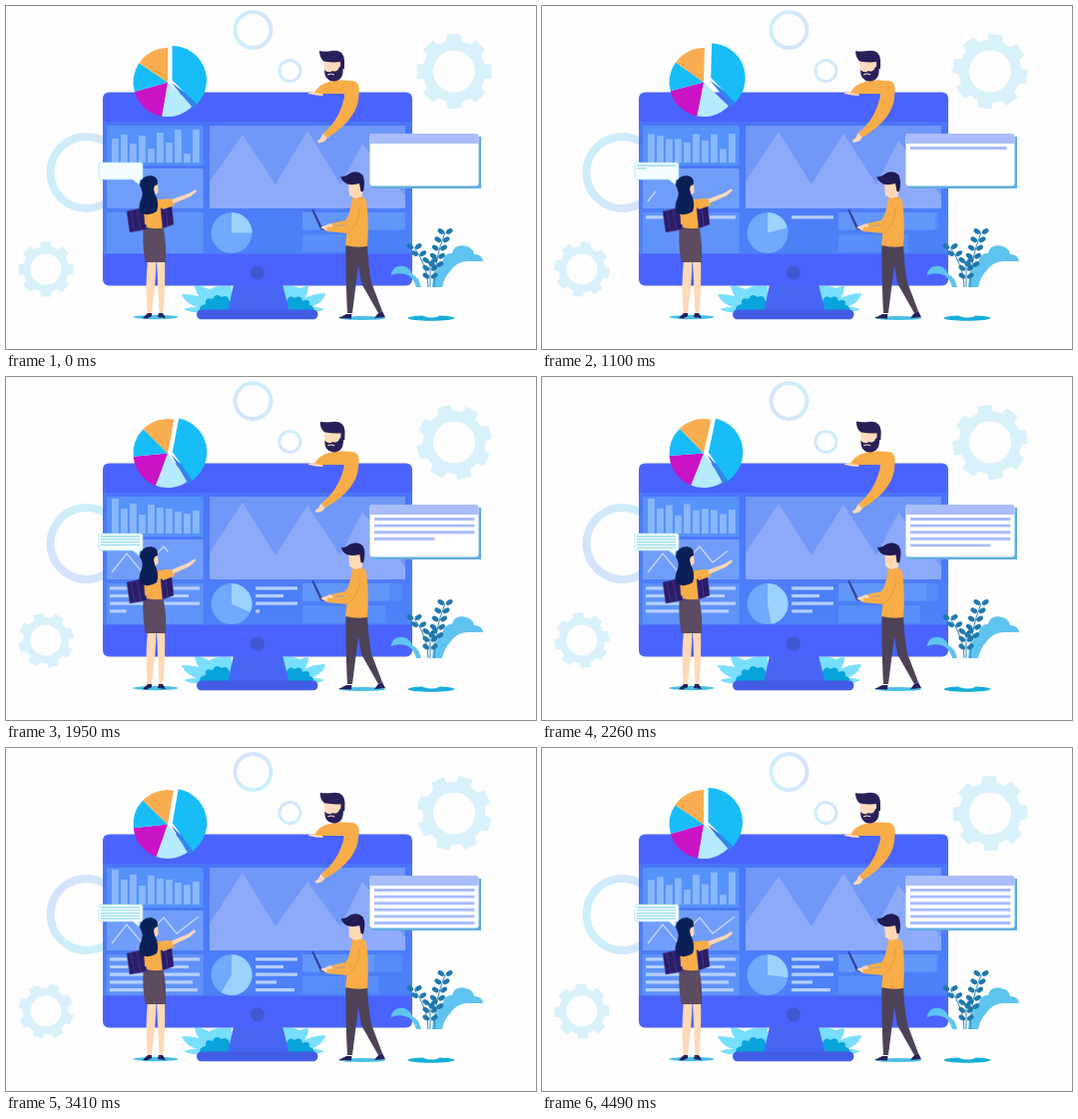
An HTML page that plays this animation: 531x344 px, repeating every 4.56 s.

```html
<!DOCTYPE html>
<html lang="en">
<head>
<meta charset="utf-8">
<title>Dashboard team</title>
<style>
  html, body { margin: 0; width: 100%; height: 100%; overflow: hidden; background: #fefefe; }
  svg { display: block; width: 531px; height: 344px; }
</style>
</head>
<body>
<svg viewBox="0 0 531 344" xmlns="http://www.w3.org/2000/svg">
  <defs>
    <linearGradient id="ringTint" x1="0" y1="0" x2="1" y2="0">
      <stop offset="0" stop-color="#cdeffa"/><stop offset="1" stop-color="#d5e3fc"/>
    </linearGradient>
    <linearGradient id="screenTint" x1="0" y1="0" x2="0" y2="1">
      <stop offset="0" stop-color="#4a74fa"/><stop offset="1" stop-color="#4c82f8"/>
    </linearGradient>
  </defs>

  <g fill="none" stroke="url(#ringTint)">
    <circle class="ring" cx="247.5" cy="24" r="18" stroke-width="4"/>
    <circle class="ring" cx="284.5" cy="65" r="10.5" stroke-width="3"/>
    <circle class="ring" cx="80.5" cy="167" r="36" stroke-width="8"/>
  </g>
  <g fill="#d9f1fa" fill-rule="evenodd">
    <path id="bigGear"/><path id="smallGear"/>
  </g>

  <!-- foliage around the stand -->
  <g fill="#79dfff">
    <path d="M214 307Q205 289 176 289Q180 303 214 307ZM216 304Q210 281 189 280Q191 298 216 304ZM226 304V281Q212 279 204 284Q208 299 226 304ZM209 307Q192 299 178 304Q186 309 209 307Z"/>
    <path d="M286 307Q294 289 320 288Q318 302 286 307ZM282 304Q286 282 303 281Q303 297 282 304ZM276 304V281Q288 279 296 284Q292 299 276 304ZM291 307Q306 299 319 304Q311 309 291 307Z"/>
  </g>
  <g fill="#08a4db">
    <path d="M195 307Q192 300 200 299Q199 291 207 294Q210 287 216 292Q222 289 224 296V307Z"/>
    <path d="M281 307V296Q284 289 289 293Q296 289 297 296Q305 293 304 300Q310 301 308 307Z"/>
  </g>

  <!-- monitor -->
  <path d="M228 279H277L284 307H222Z" fill="#4866f4"/>
  <rect x="191" y="304.500" width="121.500" height="9.800" rx="4.700" fill="#425ce6"/>
  <rect x="97" y="86.500" width="310" height="194" rx="6" fill="#4a63fc"/>
  <rect x="97" y="116" width="310" height="132.500" fill="url(#screenTint)"/>
  <circle cx="252" cy="267.500" r="7" fill="#3f58cf"/>

  <!-- screen panels -->
  <rect x="101" y="120" width="96.500" height="40" fill="#5592fa"/>
  <rect x="101" y="163" width="96.500" height="40" fill="#719dfa"/>
  <rect x="101" y="207" width="96.500" height="41" fill="#6093f9"/>
  <rect x="204" y="120" width="196" height="83" fill="#6f98f8"/>
  <path id="mountains" fill="#8daafa"/>
  <g id="bars" fill="#88b7fc"></g>
  <path id="trend" d="M106 196L121 177L135 194L158 170L171 186L193 169" pathLength="1" stroke-dasharray="1 2" fill="none" stroke="#c5d8ff" stroke-width="1.300"/>
  <g id="notes" stroke="#b5d0fd" stroke-width="3.200"></g>
  <g id="legend" stroke="#b5d0fd" stroke-width="3.200"></g>
  <circle cx="226" cy="227.500" r="20.500" fill="#70aafc"/>
  <path id="share" fill="#9bd2fe"/>
  <g fill="#669bfb">
    <rect x="297" y="207" width="100" height="17.500" opacity=".4"/>
    <rect id="meterA" x="297" y="207" height="17.500" opacity=".8"/>
    <rect id="meterB" x="297" y="229" height="17.500" opacity=".45"/>
  </g>

  <g id="pie"></g>

  <!-- man leaning over the top -->
  <path d="M303 87Q309 85 316 86L318 90Q311 90 303 88Z" fill="#ffd8b5"/>
  <path d="M309 87Q314 78 324 76Q340 72 350 77L344 88H317Z" fill="#f8ad49"/>
  <g id="pointer">
    <path d="M338 76Q356 71 353.500 88Q354 112 322.500 132L317.500 128Q334 115 339 91Z" fill="#f8ad49"/>
    <path d="M317.500 128L322 132L319 136L313 137.500L312 135.500L315 133Z" fill="#ffd8b5"/>
  </g>
  <g id="leanHead">
    <path d="M318.500 54H337V68H319Z" fill="#ffdcbd"/>
    <path d="M319 64Q323 68 327 65Q332 67 334 61H337.500Q339 75 328 75.500Q319 75 319 64Z" fill="#2a2059"/>
    <path d="M314 45Q320 46 326 45Q338 43 339 54V63H335V56Q328 57 318.500 55.500Q314 52 314 45Z" fill="#2a2059"/>
    <path d="M322 69Q326 67 329 69" stroke="#ffdcbd" fill="none"/>
  </g>

  <!-- text card -->
  <rect x="367" y="131" width="109" height="52" fill="#60addf"/>
  <rect x="364.500" y="128" width="109" height="52.500" rx="3" fill="#fff"/>
  <path d="M364.500 138V131Q364.500 128 367.500 128H470.500Q473.500 128 473.500 131V138Z" fill="#a9bdfc"/>
  <g id="card" stroke="#a9bcfb" stroke-width="2.900"></g>

  <!-- plant -->
  <ellipse cx="426" cy="313" rx="23.500" ry="2.800" fill="#16add9"/>
  <path d="M411 282H440L434 311Q427 314 418 311Z" fill="#fefefe"/>
  <g fill="#5fc3ef">
    <path d="M386 268Q389 259 399 261Q405 263 407 269Q414 272 416 282H411Q408 271 400 269Q392 267 386 270Z"/>
    <path d="M427 282Q427 267 437 258Q439 247 447 248Q449 239 459 240.500Q468 242 469 249Q477 249 478 256H462Q452 256 445 266Q439 272 437 282Z"/>
  </g>
  <g id="stems" fill="#1f78ad" stroke="#1f78ad"></g>

  <!-- woman -->
  <ellipse cx="150" cy="312" rx="22.500" ry="2.200" fill="#48bfe5"/>
  <path d="M142 254H150.500Q150 282 145.500 309H142Q139 283 142 254ZM151 254H159Q160 283 157 309H153.500Z" fill="#ffd8b5"/>
  <path d="M137 313L142 308H146V311L141 313.500ZM152 312L153 308H157L160 313Z" fill="#25205c"/>
  <path d="M138 219H157Q161 237 160 257H139.500Q136 238 138 219Z" fill="#5c4b61"/>
  <path d="M137 196Q147 191 157 195L160 222Q149 225 138 221Z" fill="#f8ad49"/>
  <g fill="#2a1d68" stroke="#53419a" stroke-width=".6">
    <path d="M121 206L138 202L141 224L124 227Z"/>
    <path d="M155 203L166 201L168 219L157 223Z"/>
    <path d="M125 205L129 226M131 204L135 225M160 202L162 221" fill="none"/>
  </g>
  <path d="M138 201L146 199L155 219L151 222L139 219Z" fill="#f8ad49"/>
  <g id="wave">
    <path d="M153 195Q160 192 167 194L169 200L157 204Z" fill="#f8ad49"/>
    <path d="M166 194L183 188L190 184L191 186L185 191L168 198Z" fill="#ffd8b5"/>
  </g>
  <path d="M144 176H152L152.500 187L149 190V197H142Z" fill="#ffd8b5"/>
  <path d="M134 180Q135 170 145 170Q153 171 152 179Q146 180 149 188Q154 197 151 206Q144 211 136 208Q131 203 136 192Q138 187 134 180Z" fill="#0b2057"/>
  <path d="M95 157H135Q137 157 137 159V172Q137 174 135 174H134L133 179L127 174H95Q93 174 93 172V159Q93 157 95 157Z" fill="#f3fdff" stroke="#a0e3f0" stroke-width=".7"/>
  <g id="chat" stroke="#9bdcec" stroke-width="1.300"></g>

  <!-- man with laptop -->
  <ellipse cx="357" cy="313" rx="23.500" ry="2" fill="#48bfe5"/>
  <path d="M340.500 238H362Q363 262 366 277L377 306L373 308L356 278L353 260L347 308H342Q340 270 340.500 238Z" fill="#4e4257"/>
  <path d="M333 313L341 309H346.500L346 313.500ZM369 313L373 308L377 306L380 312Z" fill="#25205c"/>
  <path d="M347 192Q357 189 361 195Q364 217 362 241Q351 243 340 240L343 214Z" fill="#f8ad49"/>
  <path d="M306 204L308 204L317 222L326 224L325 226L315 224Z" fill="#344399"/>
  <path d="M315 222L325 218L329 221L322 226Z" fill="#ffd8b5"/>
  <path d="M348 197Q355 197 355 207Q351 223 342 228L321 226L322 222L339 220Z" fill="#f8ad49"/>
  <path d="M347 205L340 215L326 218L328 221L341 219Z" fill="#f8ad49"/>
  <path d="M354 201Q355 218 342 228" fill="none" stroke="#e2983a" stroke-width=".8"/>
  <g id="workHead">
    <path d="M343 177H357V191L350 193L344 190Z" fill="#ffd8b5"/>
    <path d="M335.500 171Q340 172 344 168Q351 164 357 169Q360.500 175 358 186H355.500L354 178Q347 180 342 178.500Q336 176 335.500 171Z" fill="#211b55"/>
  </g>
</svg>
<script>
const NS = "http://www.w3.org/2000/svg";
const $ = id => document.getElementById(id);
const LOOP = 4560, HOLD = 778, STEP = 540 / 7, STEPS = 50;
const clamp = v => Math.max(0, Math.min(1, v));

function add(parent, tag, attrs) {
  const el = document.createElementNS(NS, tag);
  set(el, attrs);
  return parent.appendChild(el);
}
function set(el, attrs) {
  for (const name in attrs) el.setAttribute(name, attrs[name]);
}
function polar(cx, cy, r, deg) {
  const a = deg * Math.PI / 180;
  return [cx + r * Math.sin(a), cy - r * Math.cos(a)].map(v => v.toFixed(2)).join(" ");
}
function wedge(cx, cy, r, from, to) {
  return `M${cx} ${cy}L${polar(cx, cy, r, from)}A${r} ${r} 0 ${to - from > 180 ? 1 : 0} 1 ${polar(cx, cy, r, to)}Z`;
}
function gear(cx, cy, r, hole) {
  const points = [];
  for (let i = 0; i < 8; i++) {
    for (const [offset, size] of [[-14, .83], [-10.5, 1], [10.5, 1], [14, .83]])
      points.push(polar(cx, cy, r * size, i * 45 + offset));
  }
  return `M${points.join("L")}ZM${cx - hole} ${cy}a${hole} ${hole} 0 1 0 ${2 * hole} 0a${hole} ${hole} 0 1 0 ${-2 * hole} 0Z`;
}
function turn(el, deg, x, y) {
  el.setAttribute("transform", `rotate(${deg} ${x} ${y})`);
}

const poseSteps = [0, 5, 11, 20, 26, 35, 50];
function tween(k, values, steps = poseSteps) {
  let i = 1;
  while (i < steps.length - 1 && k > steps[i]) i++;
  const u = (k - steps[i - 1]) / (steps[i] - steps[i - 1]);
  return values[i - 1] + (values[i] - values[i - 1]) * u;
}

// Lines of text that are written one after another.
function textBlock(id, x, y, gap, widths) {
  const lines = widths.map((w, i) => add($(id), "line", { x1: x, y1: y + i * gap, y2: y + i * gap }));
  return progress => lines.forEach((line, i) => {
    const part = clamp(progress - i);
    set(line, { x2: x + widths[i] * part, visibility: part > 0 ? "visible" : "hidden" });
  });
}
const writeNotes = textBlock("notes", 104, 211.8, 7.7, [90, 79, 90, 83, 88]);
const writeLegend = textBlock("legend", 250, 211.8, 7.7, [42, 28, 42, 21, 39]);
const writeCard = textBlock("card", 369, 142.5, 6.6, Array(6).fill(100.5));
const writeChat = textBlock("chat", 95, 160, 2.8, Array(5).fill(39));

const barPoses = [
  [24, 28, 19, 27, 14, 30, 20, 33, 9, 33],
  [35, 25, 30, 19, 29, 26, 25, 22, 20, 23],
  [35, 26, 20, 13, 32, 8, 24, 34, 17, 30]
];
const bars = barPoses[0].map((_, i) => add($("bars"), "rect", { x: 106 + i * 9, width: 6.8 }));

const slices = [
  [132, 190, "#b5ebfd"], [190, 254, "#cb13c6"], [254, 304, "#18bdf8"], [304, 360, "#f8ae50"]
];
slices.forEach(([from, to, fill]) => add($("pie"), "path", { d: wedge(162, 76.5, 34.5, from, to), fill }));
const bigSlice = add($("pie"), "g", {});
add(bigSlice, "path", { d: wedge(165.5, 77, 34.5, 125, 139), fill: "#3284ec" });
add(bigSlice, "path", { d: wedge(166.5, 74.5, 34.5, 0, 134), fill: "#18bdf8" });

function stem(x1, y1, x2, y2, pairs, gap) {
  const g = $("stems");
  add(g, "path", { d: `M${x1} ${y1}Q${x1} ${(y1 + y2) / 2} ${x2} ${y2}`, fill: "none", "stroke-width": .9 });
  for (let i = 0; i < pairs; i++) {
    const u = 1 - i * gap, v = 1 - u;
    const x = x1 * (1 - u * u) + x2 * u * u;
    const y = v * v * y1 + u * v * (y1 + y2) + u * u * y2;
    for (const side of [-1, 1]) {
      const cx = x + side * 4.2, cy = y - 1;
      add(g, "ellipse", { cx, cy, rx: 3.7, ry: 2.3, stroke: "none", transform: `rotate(${side * -35} ${cx} ${cy})` });
    }
  }
}
stem(423, 282, 409, 242, 2, .18);
stem(425, 282, 425, 256, 3, .3);
stem(429, 282, 440, 227, 5, .15);

set($("bigGear"), { d: gear(449, 65.5, 38, 21) });
set($("smallGear"), { d: gear(40, 264, 28, 15.5) });
const rings = [...document.querySelectorAll(".ring")];

function draw(t) {
  const k = t < HOLD ? 0 : Math.min(STEPS - 1, Math.floor((t - HOLD) / STEP) + 1);
  const phase = 2 * Math.PI * k / STEPS;
  const slow = (1 - Math.cos(phase)) / 2;
  const quick = (1 - Math.cos(2 * phase)) / 2;

  turn($("bigGear"), k * 1.8, 449, 65.5);
  turn($("smallGear"), k * 1.8, 40, 264);
  rings.forEach(r => turn(r, k * 7.2, r.getAttribute("cx"), r.getAttribute("cy")));

  turn($("pie"), 12 * Math.min(1, 1.25 * slow), 162, 76.5);
  const burst = k < 10 ? 2.6 * Math.sin(Math.PI * k / 10) : 0;
  bigSlice.setAttribute("transform", `translate(${burst} ${-burst})`);

  bars.forEach((bar, i) => {
    const [a, b, c] = barPoses.map(p => p[i]);
    const height = tween(k, [a, b, b, c, b, a], [0, 12, 19, 26, 35, 50]);
    set(bar, { y: 157 - height, height });
  });

  const p1 = tween(k, [129, 126, 124, 127, 131, 125, 129]);
  const p2 = tween(k, [125, 128, 129, 128, 124, 134, 125]);
  const p3 = tween(k, [138, 135, 134, 136, 138, 134, 138]);
  set($("mountains"), { d: `M204 203V176L237 ${p1}L270 179L302 ${p2}L335 179L357 ${p3}L400 190V203Z` });

  set($("trend"), {
    "stroke-dashoffset": 1 - tween(k, [0, .1, .36, .93, 1, 1, 1]),
    visibility: k ? "visible" : "hidden"
  });
  writeNotes(k / 5);
  writeLegend(k / 5);
  writeCard(k < 11 ? k / 5.2 : 2.1 + (k - 11) * .3);
  writeChat(k / 4);

  set($("share"), { d: wedge(226, 227.5, 20.5, 0, tween(k, [90, 75, 45, 170, 240, 210, 90])) });
  set($("meterA"), { width: tween(k, [103, 97, 85, 88, 93, 72, 100]) });
  set($("meterB"), { width: tween(k, [62, 70, 86, 82, 72, 76, 62]) });

  turn($("leanHead"), 2 * slow, 328, 76);
  turn($("workHead"), 2 * slow, 350, 191);
  turn($("pointer"), 3 * quick, 347, 82);
  turn($("wave"), -4 * quick, 157, 198);
}

function tick(now) {
  draw(now % LOOP);
  requestAnimationFrame(tick);
}
draw(0);
requestAnimationFrame(tick);
</script>
</body>
</html>
```
